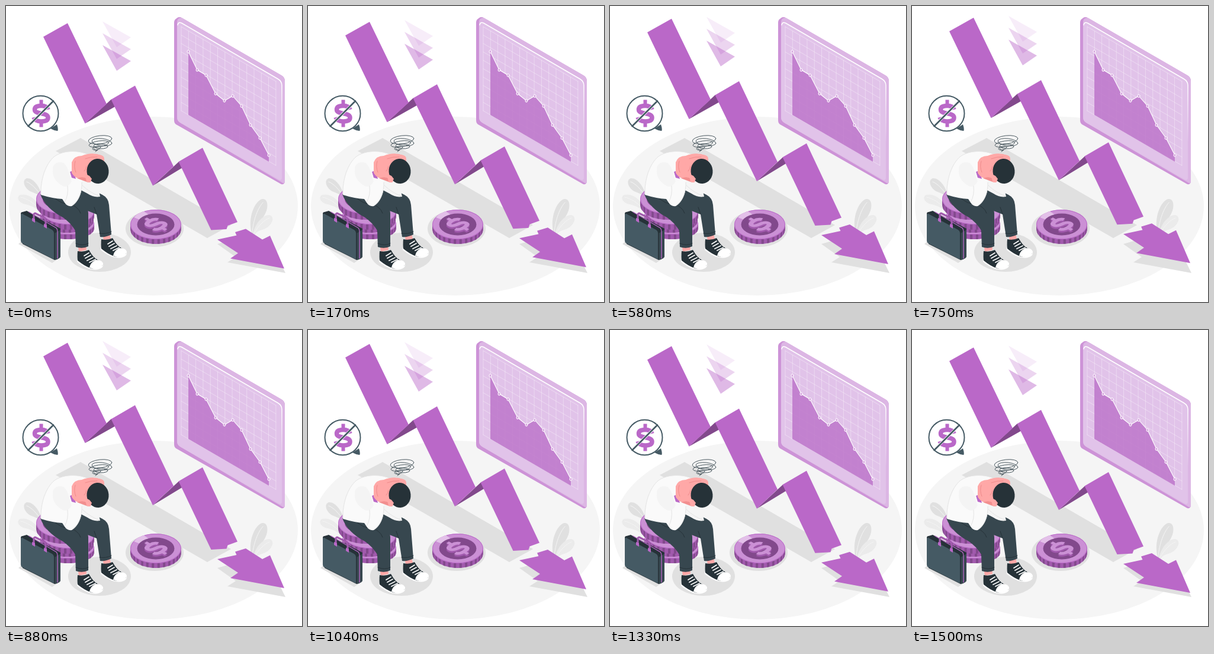
An HTML page with a canvas that plays this animation: 500 px wide and 500 px high, repeating every 1.54 s.

```html
<!DOCTYPE html>
<html lang="en">
<head>
<meta charset="utf-8">
<title>Falling market</title>
<style>
html, body { margin: 0; width: 100%; height: 100%; overflow: hidden; background: #fff; }
canvas { display: block; width: 100vw; height: 100vh; }
</style>
</head>
<body>
<canvas id="stage" width="500" height="500"></canvas>
<script>
const LOOP = 1540, PEAK = 730, LIFT = 10;
const PURPLE = '#ba68c8', DEEP = '#82498c', MID = '#a15aad', PALE = '#cb90d5';
const DARK = '#37474f', INK = '#263238', SLATE = '#455a64', SHADE = '#e0e0e0', SKIN = '#ffa8a7';
const ISO = 0.577;

const stage = document.getElementById('stage').getContext('2d');
const backdrop = document.createElement('canvas');
backdrop.width = backdrop.height = 500;
let c = backdrop.getContext('2d');

function fill(color, d) {
  c.fillStyle = color;
  c.fill(new Path2D(d));
}

function line(color, width, d) {
  c.strokeStyle = color;
  c.lineWidth = width;
  c.stroke(new Path2D(d));
}

function oval(x, y, rx, ry, color, turn = 0, strokeWidth = 0) {
  c.beginPath();
  c.ellipse(x, y, rx, ry, turn, 0, Math.PI * 2);
  if (strokeWidth) {
    c.strokeStyle = color;
    c.lineWidth = strokeWidth;
    c.stroke();
  } else {
    c.fillStyle = color;
    c.fill();
  }
}

function dollar(color) {
  c.save();
  c.lineCap = 'butt';
  line(color, 7.5, 'M11.5-6.5C10-11.5 6-13 0-13C-7-13-11-11-11-6.5C-11 2.5 11.5-2.5 11.5 7C11.5 11.5 7 13.5 0 13.5C-7 13.5-11 11.5-12.5 6.5');
  line(color, 6, 'M0-23V-13M0 13V23');
  c.restore();
}

function floor() {
  oval(249, 338, 244, 151, '#f5f5f5');
  fill(SHADE, 'M84 245L126 223L380 370L340 392Z');
  fill(SHADE, 'M357 402L388 424L374 433L472 451L447 400L405 388Z');
  oval(158, 416, 53, 33, SHADE);
  oval(251, 376, 49, 31, SHADE);
  fill(SHADE, 'M21 402L28 396L92 424L78 434Z');
}

function plants() {
  fill(SHADE, 'M415 384C408 358 420 329 433 326C444 325 444 343 435 356C427 368 419 373 417 386Z');
  fill('#ebebeb', 'M417 386C421 366 434 353 445 353C455 356 450 370 438 376C428 380 421 381 420 388Z');
  line('#f5f5f5', 1, 'M416 382C418 360 426 340 434 332M419 384C427 370 437 361 445 358');
  fill(SHADE, 'M61 322C57 303 45 290 35 291C26 294 31 309 43 314C51 317 57 319 60 325Z');
  fill('#ebebeb', 'M56 340C51 324 35 316 24 319C16 323 22 333 33 335C43 337 52 342 55 346Z');
  line('#f5f5f5', 1, 'M60 322C52 309 43 300 35 297M55 342C46 332 35 325 25 323');
}

function panel() {
  fill('#cd93d7', 'M284 28Q284 23 288 21Q292 17 297 20L465 117Q471 120 471 127V297Q470 302 465 301L289 201Q284 199 284 193Z');
  fill('#dcb6e4', 'M289 26Q290 19 297 20L465 117Q471 120 471 127V297Q470 301 466 298L294 197Q289 194 289 188Z');
  fill('#e1c3e9', 'M289 31Q290 25 297 29L459 123Q466 127 466 134V289Q466 296 460 293L294 197Q289 194 289 188Z');
  const glow = c.createLinearGradient(0, 130, 0, 230);
  glow.addColorStop(0, '#fff');
  glow.addColorStop(1, 'rgba(255,255,255,0)');
  line(glow, 1.5, 'M290 32Q291 26 297 29L459 123Q466 127 466 134V230');

  const points = [[308, 77], [323, 108], [338, 117], [354, 148], [369, 160],
    [383, 152], [398, 169], [413, 201], [429, 223], [444, 252]];
  const curve = 'M' + points.join('L');
  let grid = '';
  for (let i = 0; i < 14; i++) {
    const x = 296 + i * 12.3;
    grid += `M${x} ${35 + (x - 296) * ISO}v142`;
  }
  for (let j = 0; j < 11; j++) grid += `M296 ${35 + j * 14.2}l160 ${160 * ISO}`;
  line('rgba(255,255,255,.36)', 1, grid);
  fill('rgba(190,118,203,.85)', curve + 'V263L308 184Z');
  line('#fff', 1.1, curve);
  for (const [x, y] of points) {
    oval(x, y, 2, 2.5, '#d6a4df');
    oval(x, y, 2, 2.5, '#fff', 0, 1);
  }
}

function bubble() {
  fill(SLATE, 'M75 207Q80 210 87 211Q89 209 86 200Z');
  oval(58.5, 181.5, 30, 29.7, '#fff');
  oval(58.5, 181.5, 30, 29.7, SLATE, 0, 2);
  c.save();
  c.translate(59.5, 181.5);
  dollar(PURPLE);
  c.restore();
  line('#fff', 4.5, 'M40 200L78 163');
  line(SLATE, 2.6, 'M37.5 203L80 160.5');
}

function coin(x, y, rx, ry, depth) {
  const rim = `M${x - rx} ${y}v${depth}A${rx} ${ry} 0 0 0 ${x + rx} ${y + depth}v${-depth}Z`;
  fill(MID, rim);
  c.save();
  c.clip(new Path2D(rim));
  for (let i = 0; i < 14; i++) {
    const a = Math.PI * (i + 0.5) / 14;
    line(DEEP, 3.5 * Math.sin(a) + 0.6, `M${x - rx * Math.cos(a)} ${y + ry * Math.sin(a)}v${depth}`);
  }
  c.restore();
  oval(x, y, rx, ry, PALE);
  oval(x, y, rx - 0.5, ry - 0.5, PURPLE, 0, 1);
}

function coins() {
  coin(105, 368, 44, 18, 8);
  coin(103, 354, 45, 20, 9);
  coin(105, 347, 44, 22, 9);
  coin(96, 326, 45, 25, 10);
  oval(96, 326, 34, 18, DEEP);

  coin(253, 369, 43, 25, 8);
  fill('#e3c0e9', 'M216 357Q223 349 233 347L242 353Q231 356 226 361Z');
  oval(253, 369, 31.5, 18.5, DEEP);
  for (const [y, color] of [[371.5, MID], [368.5, PALE]]) {
    c.save();
    c.transform(0.75, -0.43, 0.75, 0.43, 253, y);
    dollar(color);
    c.restore();
  }
}

function briefcase() {
  fill(INK, 'M25 351Q25 348 28 348L35 346L92 376V423Q91 427 82 429L28 402Z');
  fill(SLATE, 'M25 353Q25 350 28 351L78 378Q81 380 81 384V428L28 401Q25 400 25 396Z');
  fill(DARK, 'M82 384L92 378V423Q91 427 82 429Z');
  line(PURPLE, 1.3, 'M39 348L85 375Q87 377 87 381V426');
  line(INK, 1, 'M27 350L79 378Q82 380 82 385V428');
  line(MID, 3.2, 'M47 361V352Q48 349 51 351L65 358Q67 360 67 363V371');
  fill(PURPLE, 'M44 358l5 2v6l-5-3ZM64 368l5 2v6l-5-3Z');
}

function shoe(x, y) {
  c.save();
  c.translate(x, y);
  fill('#fff', 'M0 8V21Q8 28 20 33Q36 37 43 30Q45 25 43 22Z');
  fill(INK, 'M1 3Q0 13 1 19Q12 28 22 32Q35 34 43 27Q44 22 35 18Q27 14 20 1Q11 5 1 3Z');
  fill('#fff', 'M21 31Q22 23 31 18Q43 17 44 25Q41 33 28 33Z');
  line('#fff', 1.8, 'M12 11L20 6M14 15L23 10M17 19L27 14M21 22L31 17');
  line('#fff', 1.2, 'M1 20Q12 29 22 32');
  c.restore();
}

function man() {
  fill(SKIN, 'M163 385H175L177 393L165 396ZM121 402H135L136 412L123 415Z');
  shoe(160, 391);
  shoe(120, 411);
  fill(DARK, 'M112 313L139 307L163 319Q173 324 174 336L178 386Q169 391 159 390L153 352L118 338Z');
  line(INK, 1, 'M158 384Q169 386 178 381M153 351L149 340');
  fill(DARK, 'M58 318Q83 320 101 316L127 330Q139 337 139 350V406Q129 411 118 407L117 379Q108 365 96 357Q67 342 58 318Z');
  line(INK, 1, 'M118 401Q130 406 139 401M104 333Q122 338 126 350M84 326Q93 333 103 335');

  fill('#f5f5f5', 'M122 285L139 298Q145 306 157 313L159 322Q148 324 138 317L119 307Z');
  fill('#fafafa', 'M59 319C58 295 66 267 82 254C96 244 121 243 139 251L130 286L128 298C129 312 124 330 111 338Q103 339 99 332L95 326Q78 325 59 319Z');
  fill('#f4f4f4', 'M80 270Q87 261 97 265C107 273 107 289 111 296Q104 308 96 304C84 297 76 287 80 270Z');
  line('#e4e4e4', 1, 'M59 318C58 295 66 267 82 254C96 244 120 243 137 250M104 304Q106 320 99 331M128 298C129 313 123 330 112 337M129 303Q142 316 158 321');

  fill(PURPLE, 'M108 280L114 278L118 292L111 290Z');
  fill(SKIN, 'M111 264Q115 253 128 253Q145 246 160 252Q167 254 166 262L150 288L142 298L136 297L131 291Q118 294 111 282Z');
  fill('#f28f8f', 'M120 291Q130 287 137 292L144 294Q142 299 136 297Z');
  oval(155, 279, 18.5, 21, INK, -0.08);
  fill(SKIN, 'M129 254Q145 247 161 252Q167 254 165 259Q154 255 146 259Q139 264 137 272L132 278Q125 270 129 254Z');
  fill(SKIN, 'M133 283L141 287L145 292L142 298L136 297Z');
  line('#ed8788', 0.9, 'M134 258Q144 254 154 255M117 262Q114 272 118 281M132 279Q135 276 136 271');
}

function scribble() {
  const loops = [[159, 226, 20, 7, -0.12], [162, 230, 17, 6, 0.12], [157, 233, 17, 5, -0.15],
    [160, 237, 12, 4, 0.05], [153, 240, 7, 3, -0.2]];
  for (const [x, y, rx, ry, turn] of loops) oval(x, y, rx, ry, DARK, turn, 0.9);
  line(DARK, 0.9, 'M148 240Q151 246 155 243L151 246');
}

function arrow() {
  [0.12, 0.28, 0.46].forEach((alpha, i) => {
    c.globalAlpha = alpha;
    fill(PURPLE, `M163 ${26.5 + i * 20}l48 27l-24 16.5Z`);
  });
  c.globalAlpha = 1;
  fill(DEEP, 'M133.5 199L178 158L186 169.5ZM248 304L292.5 263L299 273Z');
  fill(PURPLE, 'M63 52.5L104 29.5L170 166L133.5 199Z');
  fill(PURPLE, 'M177.5 158.5L218 135L283 271.5L248 304Z');
  fill(PURPLE, 'M291.5 263.5L332 240L391 365.5L374.5 371.5L372.5 377.5L346.5 379Z');
  fill(PURPLE, 'M357 395L389.5 388L387 382.5L405 377L433 395L446 388.5L470 444L379 427L392 418Z');
}

c.lineCap = c.lineJoin = 'round';
[floor, plants, panel, bubble, coins, man, briefcase, scribble].forEach(draw => draw());
c = stage;

// The arrow rises and sinks at constant speed.
let start;
function frame(now) {
  start ??= now;
  const distance = Math.abs((now - start) % LOOP - PEAK);
  const lift = LIFT * (1 - Math.min(distance, LOOP - distance) / (LOOP / 2));
  c.fillStyle = '#fff';
  c.fillRect(0, 0, 500, 500);
  c.drawImage(backdrop, 0, 0);
  c.save();
  c.translate(0, -lift);
  arrow();
  c.restore();
  requestAnimationFrame(frame);
}
requestAnimationFrame(frame);
</script>
</body>
</html>
```
